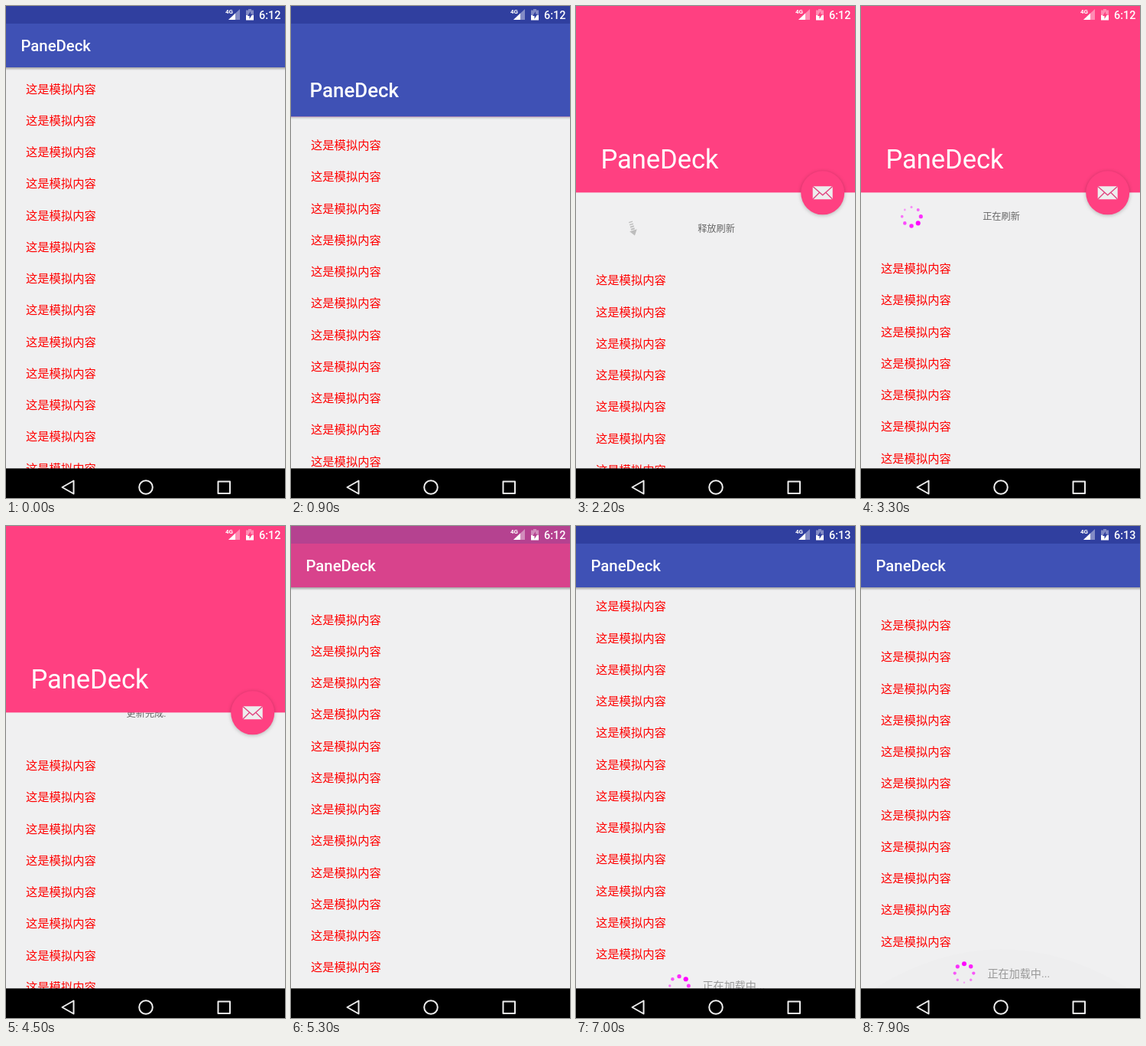
Animation of 365x642 px, one loop 8 s. Source, as an HTML page:

```html
<!DOCTYPE html>
<html lang="zh-CN">
<head>
<meta charset="utf-8">
<title>Collapsing list</title>
<style>
  html, body { margin: 0; width: 100%; height: 100%; overflow: hidden; background: #000; }
  svg { display: block; width: 365px; height: 642px; }
  text { font-family: Roboto, "Noto Sans CJK SC", "Noto Sans CJK", sans-serif; }
  .row { font-size: 15.3px; fill: #f00; }
  #fab { filter: drop-shadow(0 1.5px 2.5px rgba(0, 0, 0, .25)); }
</style>
</head>
<body>
<svg viewBox="0 0 365 642">
  <defs>
    <clipPath id="viewport"><rect id="viewportBox" x="16" width="335" height="604"/></clipPath>
    <linearGradient id="fade" x2="0" y2="1">
      <stop stop-opacity=".32"/><stop offset="1" stop-opacity="0"/>
    </linearGradient>
    <mask id="bolt">
      <rect x="310" width="20" height="23" fill="#fff"/>
      <path d="M320 7l-4 6h2.500v4l4-6.500H320z"/>
    </mask>
  </defs>
  <rect width="365" height="604" fill="#f0f0f1"/>

  <g id="header">
    <g id="arrow" fill="#bdbdbd">
      <path d="M-5 3H5L0 10ZM-2.5 0h5v2h-5zM-2.5-3h5v1.800h-5zM-2.5-6h5v1.500h-5zM-2.5-9h5v1.200h-5z"/>
    </g>
    <g id="headSpin" transform="translate(66 0)"></g>
    <text id="headText" x="183.5" y="4.6" font-size="12.2" fill="#666" text-anchor="middle"></text>
  </g>

  <g clip-path="url(#viewport)">
    <g id="list">
      <g id="footer">
        <g id="footSpin" transform="translate(135 0)"></g>
        <text x="165.5" y="5.3" font-size="14.1" fill="#999">正在加载中...</text>
      </g>
    </g>
  </g>
  <path id="glow" d="M16 604Q183 500 351 604Z"/>

  <rect id="shadow" width="365" height="4" fill="url(#fade)"/>
  <rect id="bar" width="365" fill="#ff4081"/>
  <rect id="scrim" width="365" fill="#3f51b5"/>
  <rect id="status" width="365" height="23" fill="#303f9f"/>
  <text id="title" fill="#fff">PaneDeck</text>

  <g id="fab">
    <circle r="28.5" fill="#ff4081"/>
    <rect x="-13" y="-8.5" width="26" height="17" rx="1.5" fill="#eee"/>
    <path d="M-12.500-8L0 3L12.500-8M-12.500 8L-4-.5M12.500 8L4-.5" fill="none" stroke="#e0447f" stroke-width="1.3"/>
  </g>

  <g fill="#fff">
    <text x="287" y="10" font-size="8" font-weight="700">4G</text>
    <path d="M306 4V18H291Z" opacity=".4"/>
    <path d="M300 9.600V18H291Z"/>
    <g mask="url(#bolt)">
      <path d="M317 4h4v1.500h3V12H314V5.500h3z" opacity=".4"/>
      <path d="M314 12h10v6.500h-10z"/>
    </g>
    <text id="clock" x="331" y="17" font-size="14.4" font-weight="500"></text>
  </g>

  <rect y="603.4" width="365" height="39"/>
  <g fill="none" stroke="#eee" stroke-width="2" stroke-linejoin="round">
    <path d="M88.500 619.500V636.500L73.500 628Z"/>
    <circle cx="183" cy="628" r="8.800"/>
    <rect x="277.5" y="620.5" width="15.5" height="15.5"/>
  </g>
</svg>
<script>
const LOOP = 8000, STEP = 100, ROWS = 20, PITCH = 41.25;
const EXPANDED = 243.4, COLLAPSED = 80;
const $ = id => document.getElementById(id);
const set = (id, attrs) => {
  for (const name in attrs) $(id).setAttribute(name, attrs[name]);
};
const add = (parent, tag, attrs, text = '') => {
  const node = document.createElementNS(parent.namespaceURI, tag);
  for (const name in attrs) node.setAttribute(name, attrs[name]);
  node.textContent = text;
  return parent.appendChild(node);
};

const mix = (a, b, p) => a + (b - a) * p;
const ramp = (t, from, to) => Math.min(1, Math.max(0, (t - from) / (to - from)));
const smooth = (t, from, to) => {
  const x = ramp(t, from, to);
  return x * x * (3 - 2 * x);
};
const easeOut = (t, from, to) => 1 - (1 - ramp(t, from, to)) ** 2;

// Gestures: expand, pull to refresh, collapse, then scroll to the end
const collapseAt = t => 1 - smooth(t, 600, 1300) + smooth(t, 4850, 5250);
const pullAt = t => 82 * smooth(t, 1150, 2380) - 20 * smooth(t, 2400, 2700) - 62 * smooth(t, 4300, 4710);
const scrollAt = t => 9 * (1 - smooth(t, 550, 700))
  + 140 * smooth(t, 5100, 5700) + 218.75 * easeOut(t, 5900, 7415);
const tintAt = t => 1 - easeOut(t, 950, 1500) + ramp(t, 5030, 5630) ** 2;
const fabAt = t => ramp(t, 900, 1100) - ramp(t, 5060, 5260);

for (let i = 0; i < ROWS; i++) {
  add($('list'), 'text', { class: 'row', x: 26, y: i * PITCH + 5.4 }, '这是模拟内容');
}
set('footer', { transform: `translate(0 ${ROWS * PITCH})` });

const spinners = ['headSpin', 'footSpin'].map(id =>
  Array.from({ length: 8 }, (_, i) => add($(id), 'circle', {
    cx: 12.3 * Math.cos(i * Math.PI / 4),
    cy: 12.3 * Math.sin(i * Math.PI / 4),
    fill: '#f0f'
  })));

function spin(t) {
  for (const dots of spinners) dots.forEach((dot, i) => {
    const phase = ((t - 160 - i * 120 + 2000) % 1000) / 1000;
    const size = Math.abs(1 - 2 * phase);
    dot.setAttribute('r', 3.1 * mix(.4, 1, size));
    dot.setAttribute('opacity', mix(.3, 1, size));
  });
}

function headerLabel(t) {
  if (t < 2200) return '下拉刷新';
  if (t < 2400) return '释放刷新';
  return t < 4200 ? '正在刷新' : '更新完成.';
}

function draw(t) {
  const collapse = collapseAt(t), pull = pullAt(t), tint = tintAt(t);
  const bottom = mix(EXPANDED, COLLAPSED, collapse);
  const first = bottom + 37.3 + pull;

  set('bar', { height: bottom });
  set('scrim', { height: bottom, opacity: tint });
  set('status', { opacity: tint });
  set('shadow', { y: bottom, opacity: collapse });
  set('title', {
    x: mix(32.4, 19.5, collapse), y: mix(211.7, 59, collapse),
    'font-size': mix(34.5, 20.3, collapse), 'font-weight': collapse > .5 ? 500 : 400
  });
  set('fab', { transform: `translate(322.7 ${bottom + .4}) scale(${fabAt(t)})` });

  set('viewportBox', { y: bottom + 16 });
  set('list', { transform: `translate(0 ${first - scrollAt(t)})` });
  set('header', { transform: `translate(0 ${first - 68})`, opacity: pull > .01 ? 1 : 0 });
  const turn = -180 * ramp(t, 2183, 2363);
  set('arrow', { transform: `translate(74 0) rotate(${turn})`, opacity: t < 2400 ? 1 : 0 });
  set('headSpin', { opacity: t >= 2400 && t < 4200 ? 1 : 0 });
  $('headText').textContent = headerLabel(t);
  spin(t);

  set('glow', { opacity: t < 7300 ? 0 : mix(.05, .008, ramp(t, 7300, 7900)) });
  $('clock').textContent = t < 6100 ? '6:12' : '6:13';
}

const start = performance.now();
function frame() {
  const t = (performance.now() - start) % LOOP;
  draw(Math.floor(t / STEP) * STEP);
  requestAnimationFrame(frame);
}
frame();
</script>
</body>
</html>
```
